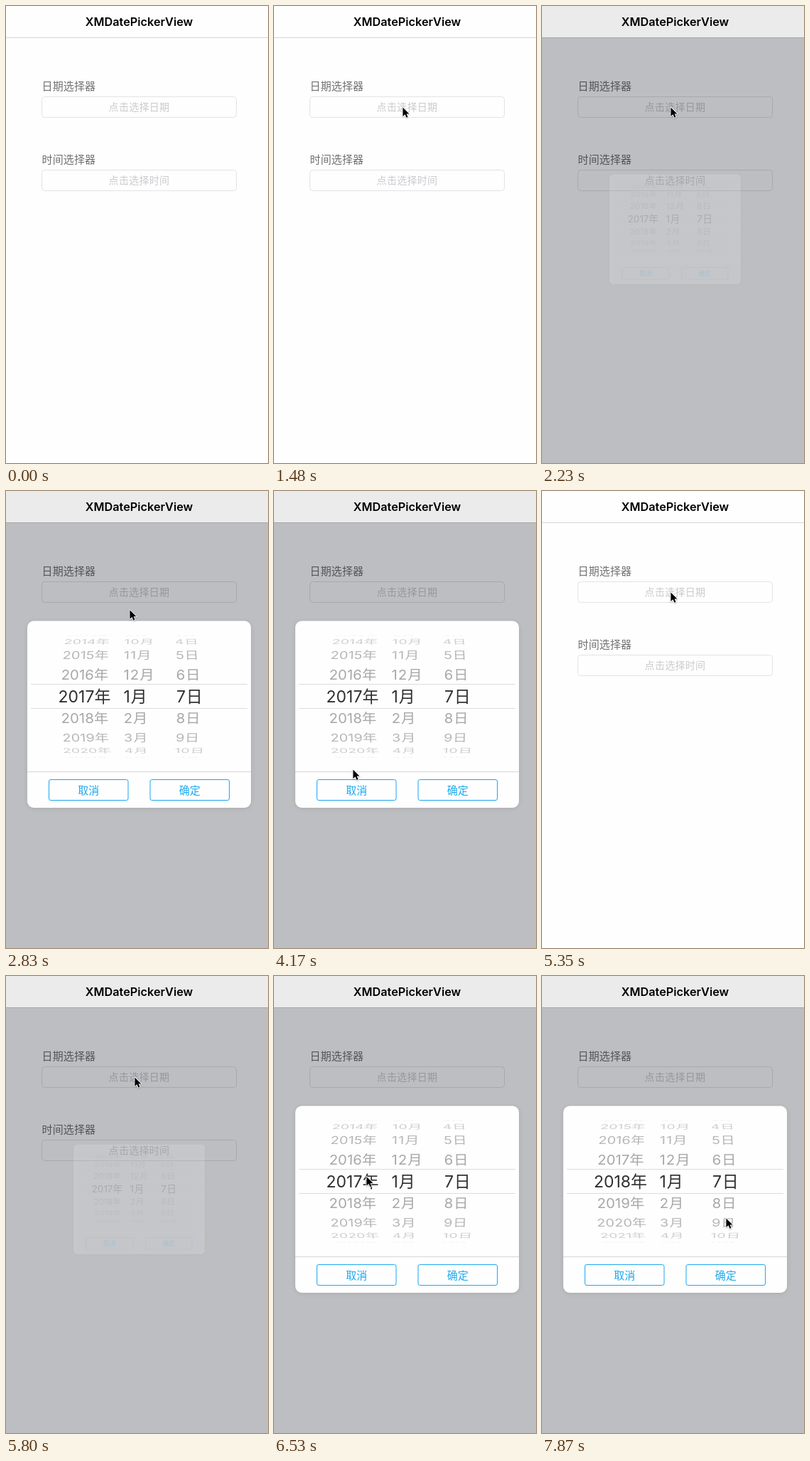
Write an HTML page with a canvas that moves like this. It is 369 px wide and 642 px high and loops after 8 s.

```html
<!DOCTYPE html>
<html lang="zh-CN">
<head>
<meta charset="utf-8">
<title>XMDatePickerView</title>
<style>
html, body { margin: 0; width: 100%; height: 100%; overflow: hidden; background: #fefefe; }
canvas { display: block; width: 369px; height: 642px; }
</style>
</head>
<body>
<canvas id="stage" width="369" height="642"></canvas>
<script>
const ctx = document.getElementById('stage').getContext('2d');
const LOOP = 8000, TICK = 148.5;
const W = 369, H = 642, MID = 187.5, CENTER = 313.5;
const FONT = 'Inter, "Noto Sans CJK SC", "Noto Sans CJK", sans-serif';
const PAPER = '#fefefe', BLUE = '#1ba8ee';
const DATE_FIELD = { x: 181, y: 142 }, CANCEL = { x: 104, y: 416 };
const YEARS = { x: 113, y: 328 }, DAYS = { x: 259, y: 340 };

const clamp = v => Math.max(0, Math.min(1, v));
const smooth = v => { v = clamp(v); return v * v * (3 - 2 * v); };

function text(str, x, y, size, color, { weight = 400, align = 'left', gap = 0 } = {}) {
  ctx.font = `${weight} ${size}px ${FONT}`;
  ctx.letterSpacing = gap + 'px';
  ctx.textAlign = align;
  ctx.fillStyle = color;
  ctx.fillText(str, x, y);
}

function line(x1, x2, y, color) {
  ctx.fillStyle = color;
  ctx.fillRect(x1, y, x2 - x1, 1);
}

function box(x, y, w, h, r, stroke) {
  ctx.beginPath();
  ctx.roundRect(x, y, w, h, r);
  ctx.strokeStyle = stroke;
  ctx.lineWidth = 1;
  ctx.stroke();
}

function field(y, label, hint) {
  text(label, 50.5, y + 5.2, 15, '#707070', { gap: 0.15 });
  box(50.5, y + 14.5, 274, 29, 4, '#e3e3e5');
  text(hint, MID, y + 33.8, 14, '#cbcbcf', { align: 'center', gap: 0.3 });
}

function page(dim) {
  ctx.fillStyle = PAPER;
  ctx.fillRect(0, 0, W, H);
  field(113, '日期选择器', '点击选择日期');
  field(216, '时间选择器', '点击选择时间');
  if (dim) {
    ctx.fillStyle = 'rgba(0,4,20,.26)';
    ctx.fillRect(0, 0, W, H);
  }
  ctx.fillStyle = dim ? '#ebebeb' : PAPER;
  ctx.fillRect(0, 0, W, 44);
  line(0, W, 44, dim ? '#a8a8aa' : '#d6d6d6');
  text('XMDatePickerView', MID, 28, 16.3, '#000', { weight: 600, align: 'center' });
}

const wrap = (v, n) => ((v - 1) % n + n) % n + 1;

// One drum row: squeezed by the turn, pulled towards the middle by perspective
function row(str, x, align, angle, size, color, gap) {
  const c = Math.cos(angle), s = Math.sin(angle), R = 86;
  if (c < 0.08) return;
  const k = 1 - 0.082 * (1 - c), off = x - MID;
  ctx.save();
  ctx.transform(k, 0, -off * 0.082 * s / R, c, MID + off * k, 288.4 + R * s);
  text(str, 0, size * 0.37, size, color(c), { align, gap });
  ctx.restore();
}

function drums(year, size, color) {
  const step = 21 * Math.PI / 180, base = Math.round(year);
  for (let i = -4; i <= 4; i++) {
    row(base + i + '年', 110.5, 'center', (base + i - year) * step, size, color, 0);
    row(wrap(1 + i, 12) + '月', 165.5, 'left', i * step, size, color, 1);
    row(wrap(7 + i, 31) + '日', 240, 'left', i * step, size, color, 0.8);
  }
}

function clipped(bands, draw) {
  ctx.save();
  ctx.beginPath();
  for (const [top, bottom] of bands) ctx.rect(30, top, 315, bottom - top);
  ctx.clip();
  draw();
  ctx.restore();
}

function dialog(p, year) {
  const scale = 0.5 + 0.5 * p;
  ctx.save();
  ctx.globalAlpha = p;
  ctx.translate(MID, CENTER);
  ctx.scale(scale, scale);
  ctx.translate(-MID, -CENTER);

  ctx.save();
  ctx.shadowColor = 'rgba(0,0,0,.1)';
  ctx.shadowBlur = 6;
  ctx.shadowOffsetY = 1;
  ctx.fillStyle = PAPER;
  ctx.beginPath();
  ctx.roundRect(30, 182.5, 315, 262.5, 9);
  ctx.fill();
  ctx.restore();

  clipped([[183, 271], [306, 394]], () =>
    drums(year, 20.5, c => `rgba(0,0,0,${0.36 * Math.pow(c, 0.8)})`));
  clipped([[271, 306]], () => drums(year, 23, () => '#303030'));

  line(35, 340, 271, '#dcdcdc');
  line(35, 340, 305, '#dcdcdc');
  line(30, 345, 394, '#d6d6d6');
  ['取消', '确定'].forEach((label, i) => {
    const x = 60.5 + i * 142.5;
    box(x, 405.5, 111.5, 29, 2.5, BLUE);
    text(label, x + 55.75, 425.7, 15, BLUE, { align: 'center' });
  });
  ctx.restore();
}

// Eased travel from one spot to another between two ticks
function glide(n, from, a, to, b) {
  const p = clamp((n - from) / (to - from));
  return { x: a.x + (b.x - a.x) * p, y: a.y + (b.y - a.y) * p };
}

function pointerAt(n) {
  if (n < 15) return glide(n, 2, { x: 0, y: 221 }, 9, DATE_FIELD);
  if (n < 30) return glide(n, 18, DATE_FIELD, 29, CANCEL);
  if (n < 41) return glide(n, 31, CANCEL, 36, DATE_FIELD);
  if (n < 48) return glide(n, 41, DATE_FIELD, 45, YEARS);
  return glide(n, 48, YEARS, 53, DAYS);
}

function pointer({ x, y }) {
  ctx.save();
  ctx.translate(x, y);
  ctx.scale(0.86, 0.86);
  ctx.beginPath();
  ctx.moveTo(0.5, 0.5);
  [[0.5, 15], [4, 11.8], [6.4, 17.2], [8.8, 16.2], [6.5, 11], [11, 11]]
    .forEach(([px, py]) => ctx.lineTo(px, py));
  ctx.closePath();
  ctx.shadowColor = 'rgba(0,0,0,.25)';
  ctx.shadowBlur = 2;
  ctx.shadowOffsetY = 1;
  ctx.strokeStyle = '#fff';
  ctx.lineWidth = 2;
  ctx.lineJoin = 'round';
  ctx.stroke();
  ctx.shadowColor = 'transparent';
  ctx.fillStyle = '#000';
  ctx.fill();
  ctx.restore();
}

// The dialog grows for two ticks after opening and shrinks faster on closing
function openness(n) {
  const grow = start => smooth(0.265 + (n - start) * 0.495);
  if (n >= 39) return grow(39);
  if (n >= 15 && n < 32) return grow(15) * (1 - smooth((n - 30) * 0.6));
  return 0;
}

function draw(time) {
  const n = Math.floor((time % LOOP + 9) / TICK);
  const p = openness(n);
  const year = 2017 + Math.sin(clamp((n - 47) / 4) * Math.PI / 2);
  page(p > 0);
  if (p > 0) dialog(p, year);
  if (n >= 2) pointer(pointerAt(n));
}

const start = performance.now();
function frame() {
  draw(performance.now() - start);
  requestAnimationFrame(frame);
}
frame();
</script>
</body>
</html>
```
